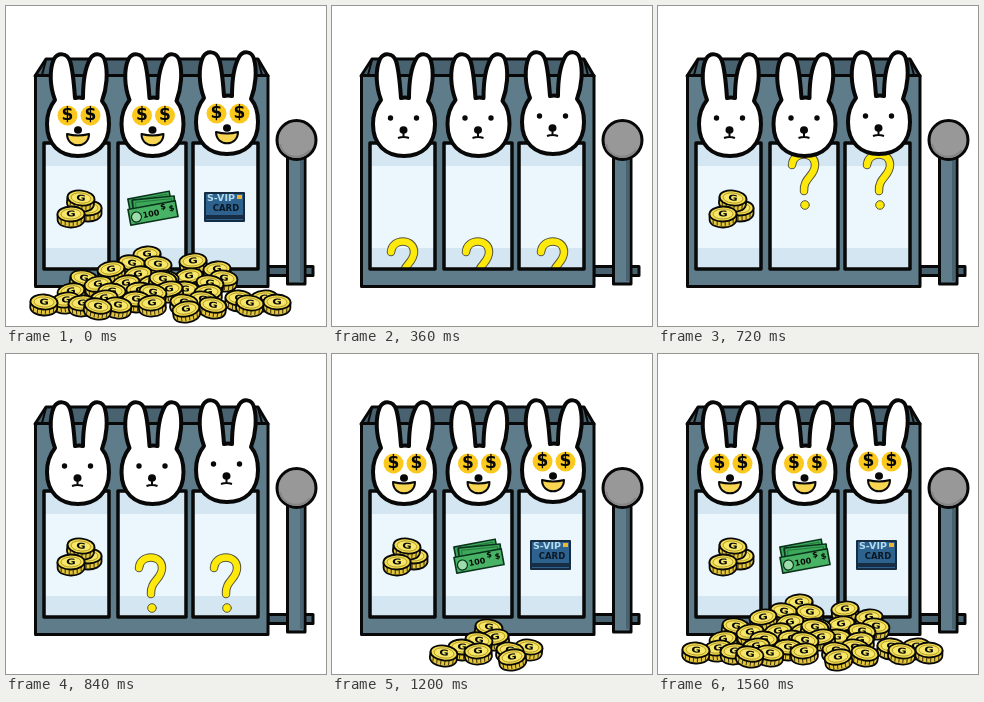
An HTML page with a canvas for the animation above (1680 ms loop, 320 by 320 pixels).

```html
<!DOCTYPE html>
<html lang="en">
<head>
<meta charset="utf-8">
<title>Bunny slot machine</title>
<style>
html, body { margin: 0; width: 100%; height: 100%; overflow: hidden; background: #fff; }
canvas { display: block; width: 100vw; height: 100vh; }
</style>
</head>
<body>
<canvas id="stage" width="320" height="320"></canvas>
<script>
const ctx = document.getElementById('stage').getContext('2d');
const STEP = 120, STEPS = 14;
const INK = '#080808', STEEL = '#5f7c8b', DARK_STEEL = '#486270';
const FONT = '"DejaVu Sans", sans-serif';

// Question marks: step -> [x, top] in the first reel
const SPIN = { 3: [70, 232], 4: [70, 150], 5: [72, 207], 6: [70, 145], 7: [69, 200], 8: [68, 166], 9: [67, 133] };

// Coin heap, back to front
const HEAP = [
  [141, 248], [187, 255], [126, 257], [152, 258], [105, 263], [211, 263], [132, 268],
  [183, 270], [159, 272], [78, 272], [218, 272], [92, 278], [120, 277], [146, 277],
  [204, 277], [65, 285], [179, 283], [106, 285], [134, 284], [202, 286]
];
const ROW = [
  [157, 273], [163, 283], [147, 286], [60, 294], [98, 292], [130, 293], [197, 293],
  [233, 292], [258, 292], [38, 296], [76, 297], [178, 296], [271, 296], [112, 299],
  [207, 299], [244, 297], [146, 297], [92, 300], [180, 303]
];

function paint(path, fill, width = 2, stroke = INK) {
  if (fill) { ctx.fillStyle = fill; ctx.fill(path); }
  if (width) { ctx.lineWidth = width; ctx.strokeStyle = stroke; ctx.stroke(path); }
}

function shape(d, fill, width, stroke) {
  paint(new Path2D(d), fill, width, stroke);
}

function oval(x, y, rx, ry, fill, width, stroke) {
  const path = new Path2D();
  path.ellipse(x, y, rx, ry, 0, 0, 7);
  paint(path, fill, width, stroke);
}

function box(x, y, w, h, fill, width, stroke) {
  const path = new Path2D();
  path.rect(x, y, w, h);
  paint(path, fill, width, stroke);
}

function label(text, x, y, size, fill = INK) {
  ctx.font = `bold ${size}px ${FONT}`;
  ctx.fillStyle = fill;
  ctx.fillText(text, x, y);
}

function at(x, y, angle, draw) {
  ctx.save();
  ctx.translate(x, y);
  ctx.rotate(angle);
  draw();
  ctx.restore();
}

function coin([x, y]) {
  at(x, y, Math.sin(x * 7 + y) * 0.17, () => {
    shape('M-13.5 0V6C-12 16 12 16 13.5 6V0Z', '#e3c63b', 1.8);
    for (let i = -10; i <= 10; i += 4) {
      const edge = 7 * Math.sqrt(1 - i * i / 190);
      shape(`M${i} ${edge}v5`, null, 1, '#3b310c');
    }
    oval(0, 0, 13.5, 7.5, '#f4df50', 1.8);
    oval(0, 0, 10, 5, '#f7e768', 0.8, '#a88c22');
    ctx.scale(1.15, 0.8);
    label('G', 0, 0.5, 10);
  });
}

function machine() {
  shape('M29 70 40 53H252L262 70Z', DARK_STEEL, 3);
  box(29.5, 69.5, 232.5, 211, STEEL, 3);
  shape('M40 54 36 69M252 54 256 69', null, 2);
}

function lever(pulled) {
  const y = pulled ? 214 : 134;
  box(262, 260.5, 45, 9, DARK_STEEL, 3);
  box(281.5, y + 16, 17.5, 262 - y, STEEL, 3);
  box(294, y + 20, 3.5, 255 - y, DARK_STEEL, 0);
  oval(290.5, y, 19.5, 19.5, '#989898', 3);
  shape(`M274 ${y + 4}C276 ${y + 18} 295 ${y + 21} 304 ${y + 10}`, null, 2, '#858585');
}

function glass(x, w) {
  box(x, 137, w, 126, '#d3e6f1');
  box(x, 160, w, 82, '#ebf6fd', 0);
}

function questionMark(x, top) {
  at(x, top, 0, () => {
    ctx.lineCap = 'round';
    const hook = 'M-11 14C-10 0 12 0 12 14C12 25 0 27 1 40';
    shape(hook, null, 8.5, '#56563f');
    shape(hook, null, 6.5, '#ffe90a');
    oval(2, 54, 4.3, 4.3, '#ffe90a', 1, '#56563f');
    ctx.lineCap = 'butt';
  });
}

function coinPrize() {
  coin([82, 202]);
  coin([75, 192]);
  coin([65, 208]);
}

function bills() {
  const note = (x, y, angle) => at(x, y, angle, () => {
    box(-21, -8, 42, 16, '#3da75a', 1.6, '#09331a');
    box(-18, -5.5, 36, 11, null, 0.8, '#1c7036');
  });
  note(144, 197, -0.19);
  note(148, 200, -0.1);
  at(147, 207, -0.18, () => {
    box(-24, -8, 48, 16, '#49b365', 1.6, '#09331a');
    oval(-17, 1, 5, 5, '#9bdcaa', 1.2, '#09331a');
    label('100', -2, 1, 8);
    label('$', 11, -4, 8);
    label('$', 19, -1, 8);
  });
}

function card() {
  box(199, 187, 39, 28, '#2d628f', 2, '#152c42');
  box(200, 209, 37, 4, '#172d43', 0);
  box(231, 189, 5, 4, '#efb436', 0);
  label('S-VIP', 215, 193, 9.5, '#b4dcef');
  label('CARD', 220, 203, 8.5, '#0b1722');
}

function bunny(i, happy) {
  ctx.save();
  ctx.translate(i * 74.5, i === 2 ? -2 : 0);
  shape('M41 118C41 106 45 99 49 94C44 81 43 64 48 53C52 46 61 47 64 55C67 64 68 78 69 92' +
    'Q73 91 77 92C77 78 79 62 84 53C88 46 97 47 99 55C102 66 101 82 96 95' +
    'C101 101 103 109 103 118C103 139 90 150 72 150C54 150 41 139 41 118Z', '#fff', 4);
  if (happy) {
    for (const x of [61.5, 84.5]) {
      oval(x, 109.5, 10, 10, '#fbc91d', 0);
      label('$', x, 110, 17);
    }
    shape('M61 128Q72 131 83 128C83 143 61 143 61 128Z', '#f8d651', 2);
    oval(72, 124, 4, 3.8, INK, 0);
  } else {
    oval(58.5, 112, 2.7, 2.7, INK, 0);
    oval(84.5, 112, 2.7, 2.7, INK, 0);
    shape('M71.5 124V131M66 132Q71.5 130 77 132', null, 2);
    oval(71.5, 124, 4, 3.8, INK, 0);
  }
  ctx.restore();
}

function draw(step) {
  const happy = step === 0 || step >= 10;
  const stopped = happy ? 3 : step >= 8 ? 2 : step >= 6 ? 1 : 0;
  const reels = [[38, 65], [112, 68], [187, 65]];
  const prizes = [coinPrize, bills, card];

  ctx.fillStyle = '#fff';
  ctx.fillRect(0, 0, 320, 320);
  lever(step === 2);
  machine();
  reels.forEach(([x, w], i) => {
    ctx.save();
    ctx.beginPath();
    ctx.rect(x, 137, w, 126);
    ctx.clip();
    glass(x, w);
    if (i < stopped) prizes[i]();
    else if (SPIN[step]) questionMark(SPIN[step][0] + i * 75, SPIN[step][1]);
    ctx.restore();
    box(x, 137, w, 126, null, 3.5);
  });
  for (let i = 0; i < 3; i++) bunny(i, happy);

  if (!happy) return;
  const full = step === 0 || step === 13;
  HEAP.filter(([, y]) => full || step === 12 && y > 264).forEach(coin);
  ROW.filter(([x]) => step !== 10 || Math.abs(x - 150) < 50).forEach(coin);
}

function tick() {
  draw(Math.floor(performance.now() / STEP) % STEPS);
  requestAnimationFrame(tick);
}

ctx.textAlign = 'center';
ctx.textBaseline = 'middle';
ctx.lineJoin = 'round';
tick();
</script>
</body>
</html>
```
